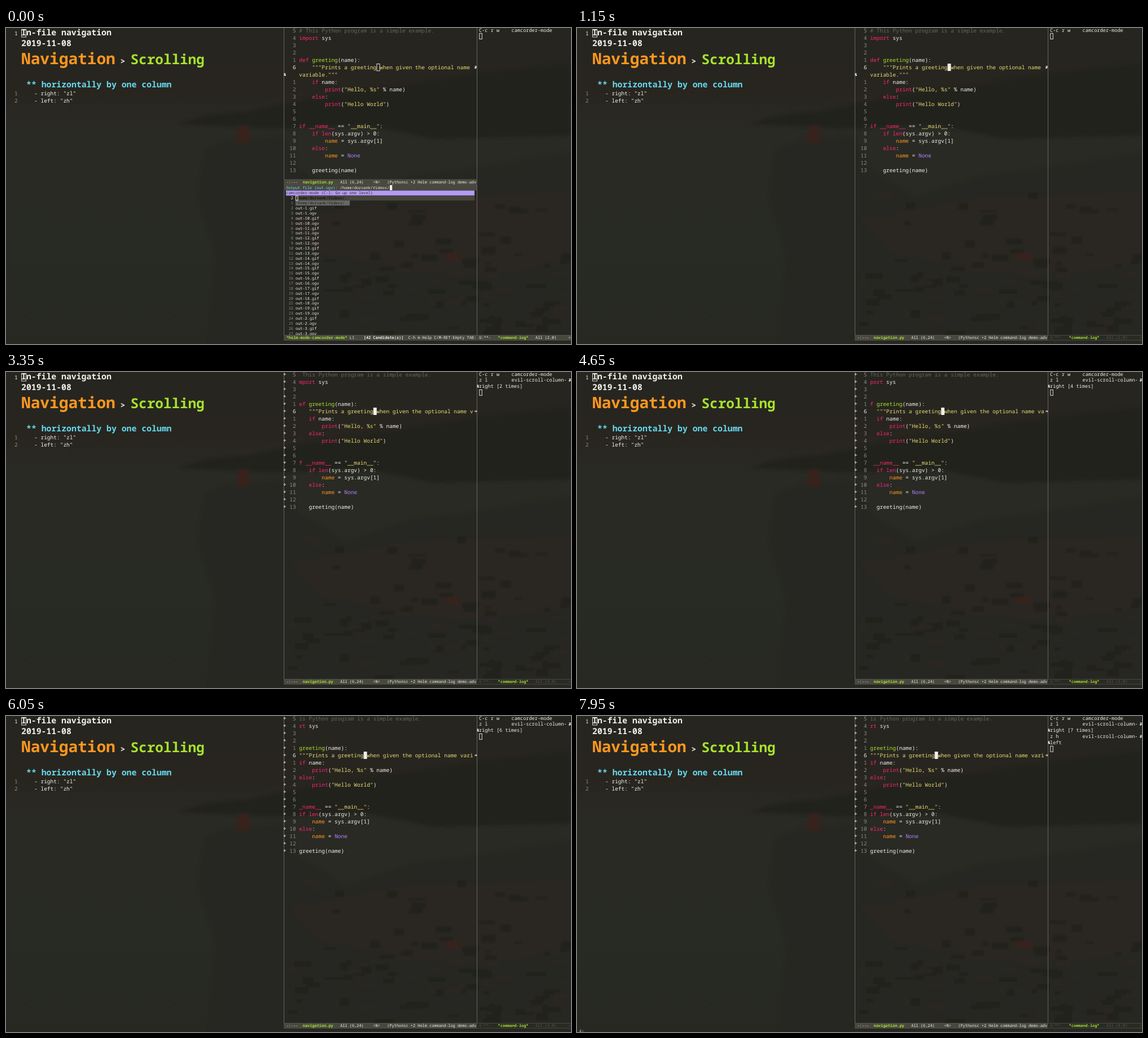
An HTML page for the animation above (8 s loop, 1001 by 559 pixels).

```html
<!DOCTYPE html>
<html lang="en">
<head>
<meta charset="utf-8">
<title>In-file navigation</title>
<style>
  html, body { margin: 0; width: 100%; height: 100%; overflow: hidden; background: #272822; }
  svg { display: block; width: 1001px; height: 559px; }
  text {
    font-family: "Noto Sans Mono", "DejaVu Sans Mono", monospace;
    white-space: pre;
    text-rendering: geometricPrecision;
  }
</style>
</head>
<body>
<svg viewBox="0 0 1001 559" xmlns="http://www.w3.org/2000/svg">
  <defs>
    <linearGradient id="sky" x2="0" y2="1">
      <stop offset="0" stop-color="#262520"/>
      <stop offset=".2" stop-color="#28251f"/>
      <stop offset=".32" stop-color="#2a2a24"/>
      <stop offset=".7" stop-color="#282a24"/>
      <stop offset="1" stop-color="#272822"/>
    </linearGradient>
    <filter id="soft" x="-20%" y="-20%" width="140%" height="140%"><feGaussianBlur stdDeviation="2.5"/></filter>
    <clipPath id="listClip"><rect x="492" y="277" width="343" height="266"/></clipPath>
  </defs>
  <rect width="1001" height="559" fill="url(#sky)"/>
  <g filter="url(#soft)">
    <path d="M310 170Q350 150 430 148L540 124 680 104 840 80 1001 62V190L760 196 640 172 480 178Z" fill="#23231e"/>
    <path d="M352 215L400 198 490 192 520 250 600 300 720 262 860 244 1001 220V559H360L372 400 340 300Z" fill="#262520"/>
    <path d="M500 340L700 300 1001 290V420L800 440 560 400Z" fill="#292620"/>
    <path d="M413 172H428L432 202H408Z" fill="#38201b"/>
    <path d="M772 390L800 400 810 410 780 408Z" fill="#3a211b"/>
    <g id="houses"></g>
  </g>
  <g id="still"></g>
  <g id="live"></g>
</svg>
<script>
const LOOP = 8000;
const BIG = 14.8, CODE = 9.53, LOG = 8.6, SMALL = 6.93;
const COL = CODE * 0.6, CODE_X = 519.3, COLS = 54;
const C = {
  w: '#f0f0ea', k: '#f92672', s: '#e6db74', c: '#67645a', o: '#fd971f', g: '#a6e22e',
  b: '#66d9ef', p: '#ae81ff', n: '#8b8b84', d: '#57564d', x: '#191916',
  line: '#66665e', bar: '#49483f', edge: '#5e5d54'
};

// Each line: its relative number, then runs marked by ~ and a colour key.
const CODE_LINES = [
  '5~c# This Python program is a simple example.',
  '4~kimport~w sys',
  '3', '2',
  '1~kdef~w ~ggreeting~w(name):',
  '6~s    """Prints a greeting when given the optional name variable."""',
  '1~k    if~w name:',
  '2~k        print~w(~s"Hello, %s"~w % name)',
  '3~k    else~w:',
  '4~k        print~w(~s"Hello World"~w)',
  '5', '6',
  '7~kif __name__~w == ~s"__main__"~w:',
  '8~k    if len~w(sys.argv) > 0:',
  '9~o        name~w = sys.argv[1]',
  '10~k    else~w:',
  '11~o        name~w = ~pNone',
  '12',
  '13~w    greeting(name)'
].map(line => {
  const [num, ...runs] = line.split('~');
  return { num, runs: runs.map(r => [r[0], r.slice(1)]) };
});
const CURSOR_LINE = 5, CURSOR_COL = 24;

// Step tracks: [start, value]. Shift -1 means wrapped lines.
const SHIFT = [[0, -1], [2000, 0], [2850, 1], [3450, 2], [4950, 3], [5650, 4], [6400, 5], [7250, 4]];
const COUNT = [[0, 0], [2050, 1], [2900, 2], [3500, 3], [4150, 4], [4950, 5], [5700, 6], [6500, 7]];
const CURSOR = [[0, 0], [200, 1], [650, 0], [1150, 1], [1650, 0], [1850, 1], [2400, 0], [2800, 1],
  [3200, 0], [3350, 1], [6800, 0], [7150, 1]];
// Key echo: prefix shown, full sequence shown, cleared.
const ECHO = [[1850, 1950, 2400], [2650, 2750, 3200], [3400, 3450, 3850], [4100, 4150, 4650],
  [4900, 4950, 5350], [5600, 5650, 6050], [7150, 7250, 7700], [7950, LOOP, LOOP]];
const HELM_END = 200, LEFT_AT = 7300;

const at = (track, t) => track.reduce((v, [start, value]) => t >= start ? value : v, 0);

function echoAt(t) {
  const e = ECHO.find(([a, , end]) => t >= a && t < end);
  return !e ? '' : t < e[1] ? 'z-' : 'z l';
}

const esc = s => s.replace(/&/g, '&amp;').replace(/</g, '&lt;');
const text = (x, y, size, fill, s, more = '') =>
  `<text x="${x}" y="${y}" font-size="${size}" fill="${fill}" ${more}>${esc(s)}</text>`;
const bold = 'font-weight="700"', end = 'text-anchor="end"';
const runs = (x, y, size, list) => `<text x="${x}" y="${y}" font-size="${size}">` +
  list.map(([key, s, more = '']) => `<tspan fill="${C[key]}" ${more}>${esc(s)}</tspan>`).join('') + '</text>';
const rect = (x, y, w, h, fill) => `<rect x="${x}" y="${y}" width="${w}" height="${h}" fill="${fill}"/>`;
const box = (x, y, w, h) =>
  `<rect x="${x}" y="${y}" width="${w}" height="${h}" fill="none" stroke="${C.w}" stroke-width=".9"/>`;
const path = (x, y, d, width) =>
  `<path transform="translate(${x} ${y})" d="${d}" fill="none" stroke="${C.w}" stroke-width="${width}"/>`;
const arrow = (x, y, dir) => path(x, y, `M${2 * dir} 0H${-2 * dir}M0 -2L${2 * dir} 0 0 2`, 0.9);
const wrapOut = (x, y) => path(x, y, 'M-1.5 -2H1V1H-1.5M0 -.6L-1.5 1 0 2.4', 1.1);
const wrapIn = (x, y) => path(x, y, 'M1.5 -2H-1V1H1.5M0 -.6L1.5 1 0 2.4', 1.1);

function slice(list, from, to) {
  let col = 0;
  return list.map(([key, s]) => {
    const cut = s.slice(Math.max(0, from - col), Math.max(0, to - col));
    col += s.length;
    return [key, cut];
  });
}

// Faint rooftops scattered over the hillside.
function houses() {
  let seed = 7, out = '';
  const rnd = () => (seed = seed * 16807 % 2147483647) / 2147483647;
  for (let i = 0; i < 150; i++) {
    const x = 500 + rnd() * 490, y = 290 + rnd() * 250;
    out += rect(x, y, 8 + rnd() * 26, 4 + rnd() * 9, rnd() < 0.5 ? '#2c2822' : '#22211c');
  }
  return out;
}

function notes() {
  return text(15, 13, CODE, C.w, '1') + box(27.6, 2.5, 8, 13.5) +
    text(27, 12.6, BIG, C.w, 'In-file navigation', bold) +
    text(27, 31.6, BIG, C.w, '2019-11-08', bold) +
    text(27, 64, 27.8, C.o, 'Navigation', bold) +
    text(202.5, 64, BIG, C.w, '>', bold) +
    text(220.5, 64, 24.3, C.g, 'Scrolling', bold) +
    text(36, 105, BIG, C.b, '** horizontally by one column', bold) +
    text(15, 119, CODE, C.n, '1') + text(50, 119, CODE, C.w, '- right: "zl"') +
    text(15, 132, CODE, C.n, '2') + text(50, 132, CODE, C.w, '- left: "zh"') +
    rect(492, 0, 1, 552, C.line);
}

function code(shift, cursor, helm) {
  const wrapped = shift < 0, from = Math.max(0, shift);
  let out = '', row = 0;
  CODE_LINES.forEach(({ num, runs: list }, i) => {
    const y = 8 + 13 * row++;
    out += text(513.7, y, CODE, i === CURSOR_LINE ? C.w : C.n, num, end);
    out += runs(CODE_X, y, CODE, slice(list, from, from + COLS));
    if (!wrapped) out += arrow(494, y - 4, -1);
    if (i !== CURSOR_LINE) return;
    out += wrapped ? wrapOut(832, y - 3.5) : arrow(832, y - 3.5, 1);
    const x = CODE_X + (CURSOR_COL - from) * COL;
    if (helm) out += box(x + 0.4, y - 9.6, COL - 0.6, 12.4);
    else if (cursor) out += rect(x, y - 10, COL + 0.2, 13, C.w);
    if (wrapped) {
      const next = 8 + 13 * row++;
      out += runs(CODE_X, next, CODE, slice(list, COLS, 99)) + wrapIn(494, next - 3.5);
    }
  });
  return out;
}

const bar = (x, y, w, fill) => rect(x, y, w, 9.4, fill) +
  rect(x, y, w, 0.6, C.edge) + rect(x, y + 8.9, w, 0.6, C.edge);

function codeBar(y) {
  return bar(492, y, 342.5, C.bar) + runs(496.7, y + 6.7, SMALL, [
    ['w', '-:---  '], ['g', 'navigation.py', bold],
    ['w', '   All (6,24)    <N>   (Pythonsc +2 Helm command-log demo-adv']
  ]);
}

function logBar(line, active) {
  const key = active ? 'w' : 'd';
  return bar(834.5, 543, 166.5, active ? C.bar : '#2a2a25') + runs(838.3, 549.7, SMALL, [
    [key, 'U:**-   '], ['g', '*command-log*', bold], [key, `   All (${line},0)     <`]
  ]);
}

function helmPane(cursor) {
  const dir = '/home/dorvank/Videos/', step = 8.86;
  const y = k => 303.4 + step * k;
  const names = [1, ...Array.from({ length: 10 }, (_, i) => 10 + i), 2, 3]
    .flatMap(n => [`out-${n}.gif`, `out-${n}.ogv`]);
  let out = rect(492, 277, 342, 10.6, C.bar) +
    runs(496.3, 284.9, SMALL, [['b', 'Output file (out.ogv): '], ['w', dir]]);
  if (cursor) out += rect(680, 278, 4.2, 9, C.w);
  out += rect(496, 287.6, 334, 8.8, '#b49af5') +
    text(496.3, 294.3, SMALL, '#34332e', 'camcorder-mode (C-l: Go up one level)') +
    rect(513, 296.4, 317, 8.8, '#46453c') + rect(513, 305.2, 96, 8.8, '#696966') +
    text(509, y(0), SMALL, C.w, '2', end) + text(509, y(1), SMALL, C.n, '1', end) +
    text(513, y(0), SMALL, C.x, dir + '.', bold) + text(513, y(1), SMALL, C.x, dir + '..') +
    box(513.3, 296.9, 3.8, 8);
  names.forEach((name, i) => {
    const k = i + 2;
    out += text(509, y(k), SMALL, C.n, String(k), end) + text(513, y(k), SMALL, C.w, name);
  });
  return `<g clip-path="url(#listClip)">${out}</g>` + bar(492, 543, 342.5, C.bar) +
    runs(496.7, 549.7, SMALL, [
      ['g', '*helm-mode-camcorder-mode*', bold], ['w', ' L1    '], ['w', '[42 Candidate(s)]', bold],
      ['w', '  C-h m:Help C/M-RET:Empty TAB:']
    ]);
}

function commandLog(count, left) {
  const top = r => -1.8 + 10.9 * r;
  let row = 0, out = '';
  const entry = (keys, command, rest) => {
    const y = top(row++) + 8.3;
    out += text(838, y, LOG, C.w, keys) + text(895.5, y, LOG, C.w, command);
    if (!rest) return;
    const next = top(row++) + 8.3;
    out += wrapOut(999, y - 3) + wrapIn(836.2, next - 3) + text(838, next, LOG, C.w, rest);
  };
  entry('C-c r w', 'camcorder-mode');
  if (count) entry('z l', 'evil-scroll-column-', 'right' + (count > 1 ? ` [${count} times]` : ''));
  if (left) entry('z h', 'evil-scroll-column-', 'left');
  return out + box(838.8, top(row) + 0.5, 4.5, 10);
}

const live = document.getElementById('live');
document.getElementById('houses').innerHTML = houses();
document.getElementById('still').innerHTML = notes();
let shown = '';

function draw(t) {
  const helm = t < HELM_END, prompt = t < 50, left = t >= LEFT_AT;
  const shift = at(SHIFT, t), count = at(COUNT, t), cursor = at(CURSOR, t), echo = echoAt(t);
  const state = [helm, prompt, left, shift, count, cursor, echo].join();
  if (state === shown) return;
  shown = state;
  live.innerHTML = rect(834, 0, 1, 543, C.line) + code(shift, cursor, helm) +
    (helm ? codeBar(267.8) + helmPane(prompt) : codeBar(543)) +
    commandLog(count, left) + logBar(2 + (count > 0) + left, helm) +
    text(4, 559.4, SMALL, C.w, echo);
}

function tick() {
  draw(performance.now() % LOOP);
  requestAnimationFrame(tick);
}
tick();
</script>
</body>
</html>
```
